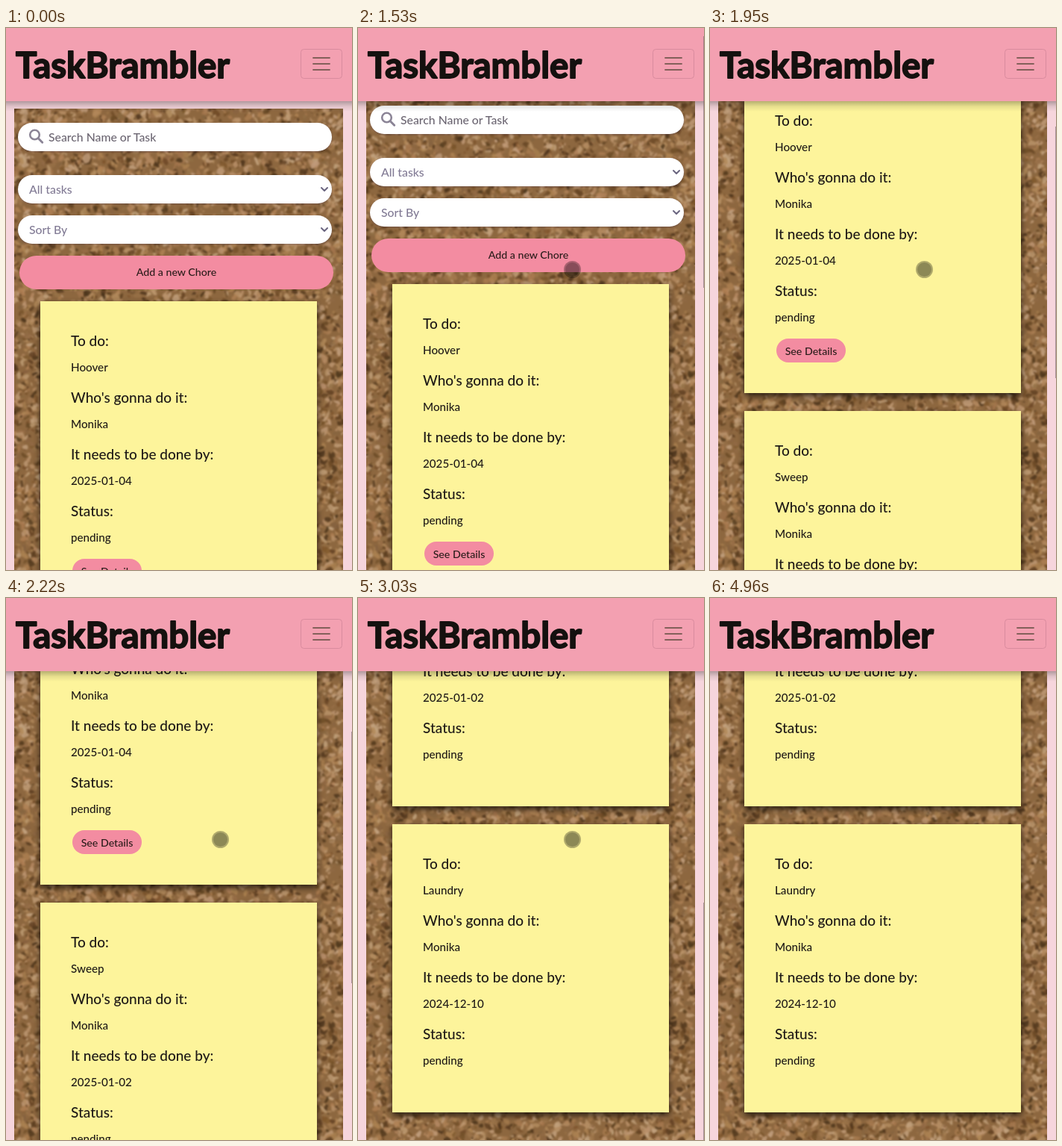
Recreate the animation shown at these times as an HTML page with a canvas. Size 464 px wide and 726 px high, loop 5290 ms.

```html
<!DOCTYPE html>
<html lang="en">
<head>
<meta charset="utf-8">
<title>Chore board</title>
<style>
  html, body { margin: 0; width: 100%; height: 100%; overflow: hidden; background: #f6d5dc; }
  canvas, svg { position: absolute; left: 0; top: 0; width: 464px; height: 726px; display: block; }
  text { font-family: Lato, "Open Sans", sans-serif; font-weight: 500; fill: #1f1a17; }
  .head { font-size: 19px; }
  .body { font-size: 15.2px; }
  .btn { font-size: 14.2px; text-anchor: middle; fill: #2a1c1a; }
  .field { font-size: 15.8px; fill: #827b95; }
  .find { fill: #6c6672; }
  .title { font-size: 47.4px; font-weight: 700; fill: #15110f; stroke: #15110f; stroke-width: 1.8; stroke-linejoin: round; }
  .note { fill: #fdf49b; filter: drop-shadow(0 4px 4px rgba(0, 0, 0, .7)); }
  .pill { fill: #fff; filter: drop-shadow(0 1px 1px rgba(60, 40, 70, .35)); }
  .line { fill: none; stroke-linecap: round; stroke-linejoin: round; }
</style>
</head>
<body>
<canvas id="cork" width="464" height="726"></canvas>
<svg id="stage" viewBox="0 0 464 726">
  <defs>
    <linearGradient id="shade" x1="0" y1="0" x2="0" y2="1">
      <stop offset="0" stop-color="#000" stop-opacity=".28"/>
      <stop offset=".5" stop-color="#000" stop-opacity=".09"/>
      <stop offset="1" stop-color="#000" stop-opacity="0"/>
    </linearGradient>
  </defs>
  <g id="page">
    <rect y="-10" width="464" height="118" fill="#f6d5dc"/>
    <g id="form"></g>
    <g id="notes"></g>
  </g>
  <rect y="98" width="464" height="14" fill="url(#shade)"/>
  <rect width="464" height="98" fill="#f3a0b1"/>
  <text class="title" x="13" y="67">TaskBrambler</text>
  <rect x="395.5" y="28.5" width="55" height="39" rx="4" fill="none" stroke="#d98b9e"/>
  <path class="line" d="M412 40h22M412 48h22M412 56h22" stroke="#83605a" stroke-width="1.8"/>
  <rect id="bar" x="463" width="1" height="337" fill="#75656b"/>
  <g id="dot">
    <circle r="11.5" fill="#000" fill-opacity=".3"/>
    <circle r="9.5" fill="#000" fill-opacity=".2"/>
  </g>
</svg>
<script>
const LOOP = 5290;
const el = id => document.getElementById(id);

const text = (cls, x, y, s) => `<text class="${cls}" x="${x}" y="${y}">${s}</text>`;
const pill = (x, y, w, h, attrs) => `<rect x="${x}" y="${y}" width="${w}" height="${h}" rx="${h / 2}" ${attrs}/>`;
const white = y => pill(16, y, 421, 38, 'class="pill"');
const pink = 'fill="#f38ca1"';

function select(y, label) {
  return white(y) + text('field', 31, y + 25, label) +
    `<path class="line" d="M423 ${y + 17}l4 4l4 -4" stroke="#6b6680" stroke-width="2"/>`;
}

function note(y, h, task, date, button) {
  const rows = [['To do:', task], ["Who's gonna do it:", 'Monika'],
    ['It needs to be done by:', date], ['Status:', 'pending']];
  let out = `<rect class="note" x="46" y="${y}" width="371" height="${h}"/>`;
  rows.forEach(([head, body], i) => {
    out += text('head', 87, y + 60 + i * 76, head) + text('body', 87, y + 94 + i * 76, body);
  });
  if (button) out += pill(89, y + 345, 93, 32, pink) + text('btn', 135.5, y + 367, 'See Details');
  return out;
}

el('form').innerHTML = white(127) +
  '<circle cx="38.5" cy="143" r="6.3" fill="none" stroke="#8b8496" stroke-width="2.6"/>' +
  '<path class="line" d="M43.5 148l5.2 5.2" stroke="#8b8496" stroke-width="3"/>' +
  text('field find', 57, 152, 'Search Name or Task') +
  select(197, 'All tasks') + select(251, 'Sort By') +
  pill(18, 305, 421, 45, pink) + text('btn', 228.5, 332, 'Add a new Chore');

el('notes').innerHTML = note(366, 418, 'Hoover', '2025-01-04', true) +
  note(808, 386, 'Sweep', '2025-01-02') + note(1218, 386, 'Laundry', '2024-12-10');

// Cork board: seeded irregular chips with dark gaps, softened at the end
function drawCork() {
  const ctx = el('cork').getContext('2d');
  let seed = 7;
  const rnd = () => (seed = (seed * 16807) % 2147483647) / 2147483647;
  const chip = (size, color) => {
    const x = 11 + rnd() * 441, y = rnd() * 726, turn = rnd() * 6.28, flat = .35 + rnd() * .5;
    const cos = Math.cos(turn), sin = Math.sin(turn);
    ctx.beginPath();
    for (let i = 0; i < 7; i++) {
      const a = i * .9, r = size * (.5 + rnd() * .8);
      const px = Math.cos(a) * r, py = Math.sin(a) * r * flat;
      ctx.lineTo(x + px * cos - py * sin, y + px * sin + py * cos);
    }
    ctx.fillStyle = color;
    ctx.fill();
  };
  ctx.beginPath();
  ctx.rect(11, 0, 441, 726);
  ctx.clip();
  ctx.fillStyle = '#8d673f';
  ctx.fillRect(11, 0, 441, 726);
  for (let i = 0; i < 11000; i++) {
    const dark = rnd() < .32;
    const light = dark ? 19 + rnd() * 15 : 38 + rnd() * 26;
    chip(2 + rnd() * (dark ? 4 : 5), `hsla(${28 + rnd() * 5},${dark ? 48 : 36}%,${light}%,.85)`);
  }
  ctx.filter = 'blur(1.1px)';
  ctx.drawImage(el('cork'), 0, 0);
}

// Progress 0..1 in n equal jumps, the first at a and the last at b
function steps(t, a, b, n) {
  if (t < a - 5) return 0;
  return Math.min(n, 1 + Math.floor((t - a) / (b - a) * (n - 1) + .1)) / n;
}
// Cubic ease with starting slope m and a soft stop
const ease = (u, m) => m * u * (1 - u) ** 2 + u * u * (3 - 2 * u);
const mix = (p, q, u) => p.map((v, i) => v + (q[i] - v) * u);

const EDGE_IN = [407.5, 718], PAUSE = [295.5, 337.5], REST = [287.5, 323.5],
  LIFT = [284.5, 326.5], EDGE_OUT = [423.5, 723.5];

function dotAt(t) {
  if (t < 70 || t >= 4960) return null;
  if (t < 600) return mix(EDGE_IN, PAUSE, ease((steps(t, 70, 410, 6) * 6 - 1) / 5, 1.3));
  if (t < 3700) return mix(PAUSE, REST, steps(t, 610, 740, 3));
  if (t < 4390) return mix(REST, LIFT, steps(t, 3730, 3870, 3));
  return mix(LIFT, EDGE_OUT, ease(steps(t, 4400, 4890, 8), .4));
}

function barAlpha(t) {
  if (t < 1530 || t >= 3870) return 0;
  if (t < 3450) return .6;
  return t < 3590 ? .48 : t < 3730 ? .34 : t < 3800 ? .2 : .1;
}

function draw(t) {
  const scroll = Math.round(400 * ease(steps(t, 1530, 2220, 11), .45) +
    515 * ease(steps(t, 2550, 3030, 8), 1.78));
  el('page').setAttribute('transform', `translate(0 ${-scroll})`);
  el('bar').setAttribute('y', Math.round(1 + scroll * .445));
  el('bar').setAttribute('opacity', barAlpha(t));
  const p = dotAt(t);
  el('dot').setAttribute('visibility', p ? 'visible' : 'hidden');
  if (p) el('dot').setAttribute('transform', `translate(${p[0]} ${p[1]})`);
}

drawCork();
draw(0);
const start = performance.now();
function tick() {
  draw((performance.now() - start) % LOOP);
  requestAnimationFrame(tick);
}
requestAnimationFrame(tick);
</script>
</body>
</html>
```
